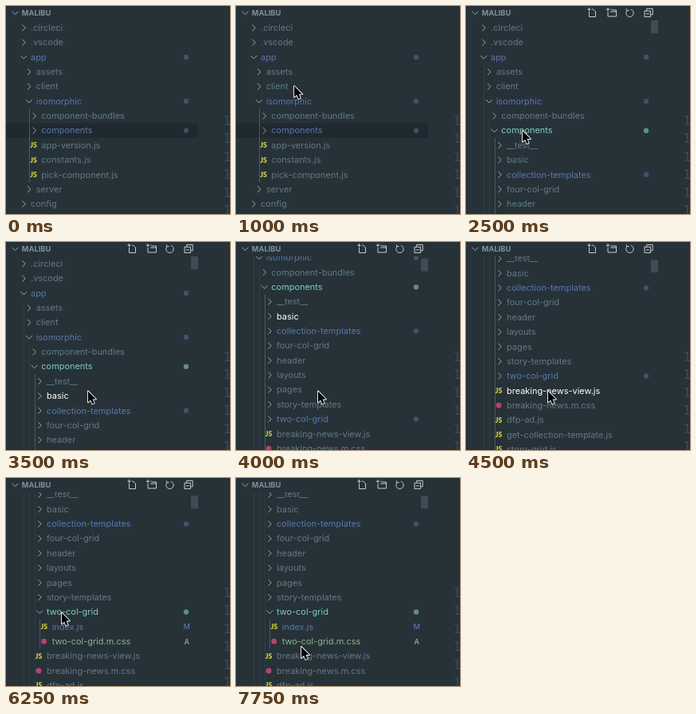
These frames come from a looping animation (281x260 px, 8 s). An HTML page with a canvas:

```html
<!DOCTYPE html>
<html lang="en">
<head>
<meta charset="utf-8">
<title>File tree</title>
<style>
html, body { margin: 0; width: 100%; height: 100%; overflow: hidden; background: #263238; }
canvas { display: block; width: 100vw; height: 100vh; }
</style>
</head>
<body>
<canvas id="stage"></canvas>
<script>
const W = 281, H = 260, LOOP = 8000, STEP = 250;
const ROW = 18.35, FIRST = 27.3, HEADER = 18, PANEL = 241;
const FONT = 'Inter, "Open Sans", sans-serif';
const color = {
  bg: '#263238', band: '#1f292e', text: '#607a86', title: '#80919a',
  modified: '#5a76ad', added: '#8ab688', selected: '#80cbc4', hover: '#ffffff',
  chevron: '#9ba8ae', icon: '#c3cbcf', guide: '#2f3d45', activeGuide: '#4a5b64',
  thumb: '#3d4c55', lineNumber: '#3c4d56', js: '#cbcb41', css: '#b8426f'
};

// Indentation is the depth of an entry, * marks modified and + marks added ones
const outline = `
 .circleci
 .vscode
 app*
  assets
  client
  isomorphic*
   component-bundles
   components*
    __test__
    basic
    collection-templates*
    four-col-grid
    header
    layouts
    pages
    story-templates
    two-col-grid*
     index.js*
     two-col-grid.m.css+
    breaking-news-view.js
    breaking-news.m.css
    dfp-ad.js
    get-collection-template.js
    story-grid.js
   app-version.js
   constants.js
   pick-component.js
  server
 config`;

const ancestors = [];
const tree = outline.trim().split('\n').map(entry => {
  const name = entry.trim().replace(/[*+]$/, '');
  const depth = Math.max(1, entry.search(/\S/));
  const git = entry.endsWith('*') ? 'modified' : entry.endsWith('+') ? 'added' : '';
  ancestors[depth] = name;
  return { name, depth, git, parents: ancestors.slice(1, depth), type: name.match(/\w\.(js|m\.css)$/)?.[1] };
});

// Pointer glides: start time, end time, x and y of the goal
const glides = [
  [250, 1250, 47, 117], [1250, 1750, 70, 155], [3000, 3500, 102, 185.5],
  [4750, 5250, 93, 171], [6000, 6250, 69, 167.5], [6250, 6750, 58, 171],
  [7000, 7250, 8, 222], [7250, 7750, 81, 210]
];

const canvas = document.getElementById('stage');
const ctx = canvas.getContext('2d');
const scale = window.devicePixelRatio || 1;
canvas.width = W * scale;
canvas.height = H * scale;

const progress = (t, start, end) => Math.min(1, Math.max(0, (t - start) / (end - start)));
const smooth = p => p * p * (3 - 2 * p);

function pointerAt(t) {
  let x = 208, y = 2;
  for (const [start, end, goalX, goalY] of glides) {
    const p = smooth(progress(t, start, end));
    x += (goalX - x) * p;
    y += (goalY - y) * p;
  }
  return [x, y];
}

function stateAt(t) {
  const open = ['app', 'isomorphic'];
  if (t >= 2500) open.push('components');
  if (t >= 5500) open.push('two-col-grid');
  return {
    open,
    focused: t >= 2250,
    inside: t !== 7250,
    selected: t >= 5250 ? 'two-col-grid' : 'components',
    hover: t < 3500 || t >= 5000 ? '' : t < 4500 ? 'basic' : 'breaking-news-view.js',
    scroll: 153.4 * smooth(progress(t, 3500, 4500) ** 0.737)
  };
}

function line(x, y, ...moves) {
  ctx.beginPath();
  ctx.moveTo(x, y);
  for (const [dx, dy] of moves) ctx.lineTo(x += dx, y += dy);
  ctx.stroke();
}

function dot(x, y, r, fill) {
  ctx.beginPath();
  ctx.arc(x, y, r, 0, Math.PI * 2);
  ctx.fillStyle = fill;
  ctx.fill();
}

function text(value, x, y, fill, font, align = 'left') {
  ctx.font = font;
  ctx.textAlign = align;
  ctx.fillStyle = fill;
  ctx.fillText(value, x, y);
}

function chevron(x, y, open) {
  const s = 3.9;
  ctx.strokeStyle = color.chevron;
  if (open) line(x - s, y - 2, [s, 4], [s, -4]);
  else line(x - 2, y - s, [4, s], [-4, s]);
}

const chevronX = depth => 22.3 + (depth - 1) * 6.67;

function drawRow(row, y, state) {
  const { name, depth, git, type } = row;
  const selected = name === state.selected;
  const x = chevronX(depth) + 8.7;

  if (selected && !state.focused) {
    ctx.fillStyle = color.band;
    ctx.fillRect(0, y - ROW / 2, PANEL, ROW);
  }
  for (let level = 1; level < depth; level++) {
    const active = level === state.open.length;
    if (!active && !state.focused) continue;
    ctx.fillStyle = active ? color.activeGuide : color.guide;
    ctx.fillRect(Math.round(chevronX(level)), y - ROW / 2, 1, ROW);
  }

  if (type === 'js') text('JS', x - 14.2, y + 3.2, color.js, '900 8.7px Lato, sans-serif');
  else if (type) dot(x - 10, y, 3.4, color.css);
  else chevron(chevronX(depth), y, state.open.includes(name));

  const fill = selected && state.focused ? color.selected
    : git ? color[git]
    : name === state.hover ? color.hover : color.text;
  text(name, x, y + 3.7, fill, `10.95px ${FONT}`);

  if (git && type) {
    text(git[0].toUpperCase(), 226.8, y + 3.3, fill, `500 9.2px ${FONT}`, 'center');
  } else if (git) {
    ctx.globalAlpha = fill === color.selected ? 0.6 : 0.48;
    dot(226, y, 3.2, fill);
    ctx.globalAlpha = 1;
  }
}

function plus(x, y) {
  line(x - 2.2, y, [4.4, 0]);
  line(x, y - 2.2, [0, 4.4]);
}

function drawToolbar() {
  ctx.strokeStyle = color.icon;
  // new file
  line(154.5, 7, [0, 6.5], [8, 0], [0, -6.5], [-3, -3], [-1.5, 0]);
  plus(154.5, 4.2);
  // new folder
  line(178, 7, [0, 6], [10.5, 0], [0, -8], [-5, 0], [-1, -1], [-1, 0]);
  line(181, 7, [7.5, 0]);
  plus(178, 4.2);
  // refresh
  ctx.beginPath();
  ctx.arc(205.5, 8.8, 4.7, -1.3, Math.PI * 1.28);
  ctx.stroke();
  line(201.2, 3.2, [0.6, 2.6], [2.8, -0.3]);
  // collapse all
  ctx.strokeRect(224, 6.2, 7.4, 7.2);
  line(226.6, 6, [0, -2.6], [7.6, 0], [0, 7.4], [-2.6, 0]);
  line(225.8, 9.8, [3.8, 0]);
}

function drawPointer(x, y) {
  ctx.save();
  ctx.translate(x + 0.9, y + 1);
  const shape = new Path2D('M0 0V13.8L3.2 11L5.4 16L7.8 15L5.7 10.1H10Z');
  ctx.lineJoin = 'round';
  ctx.lineWidth = 1.8;
  ctx.strokeStyle = '#ffffff';
  ctx.stroke(shape);
  ctx.fillStyle = '#000000';
  ctx.fill(shape);
  ctx.restore();
}

function draw(t) {
  const state = stateAt(t);
  ctx.setTransform(scale, 0, 0, scale, 0, 0);
  ctx.lineWidth = 1;
  ctx.fillStyle = color.bg;
  ctx.fillRect(0, 0, W, H);

  for (let y = 149; y < H + ROW; y += 22.4) {
    text('1', 272.6, y, color.lineNumber, '16px "DejaVu Sans Mono", monospace');
  }

  ctx.save();
  ctx.beginPath();
  ctx.rect(0, HEADER, PANEL, H - HEADER);
  ctx.clip();
  tree.filter(row => row.parents.every(name => state.open.includes(name)))
    .forEach((row, i) => drawRow(row, FIRST + i * ROW - state.scroll, state));
  if (state.focused) {
    ctx.fillStyle = color.thumb;
    ctx.fillRect(232, HEADER + state.scroll * 0.027, 9, 16);
  }
  ctx.restore();

  chevron(11.5, 8.7, true);
  text('MALIBU', 19.8, 12, color.title, `700 9.3px ${FONT}`);
  if (state.focused && state.inside) drawToolbar();
  if (t >= 250 && state.inside) drawPointer(...pointerAt(t));
}

function tick() {
  const t = performance.now() % LOOP;
  draw(Math.floor(t / STEP) * STEP);
  requestAnimationFrame(tick);
}
tick();
</script>
</body>
</html>
```
